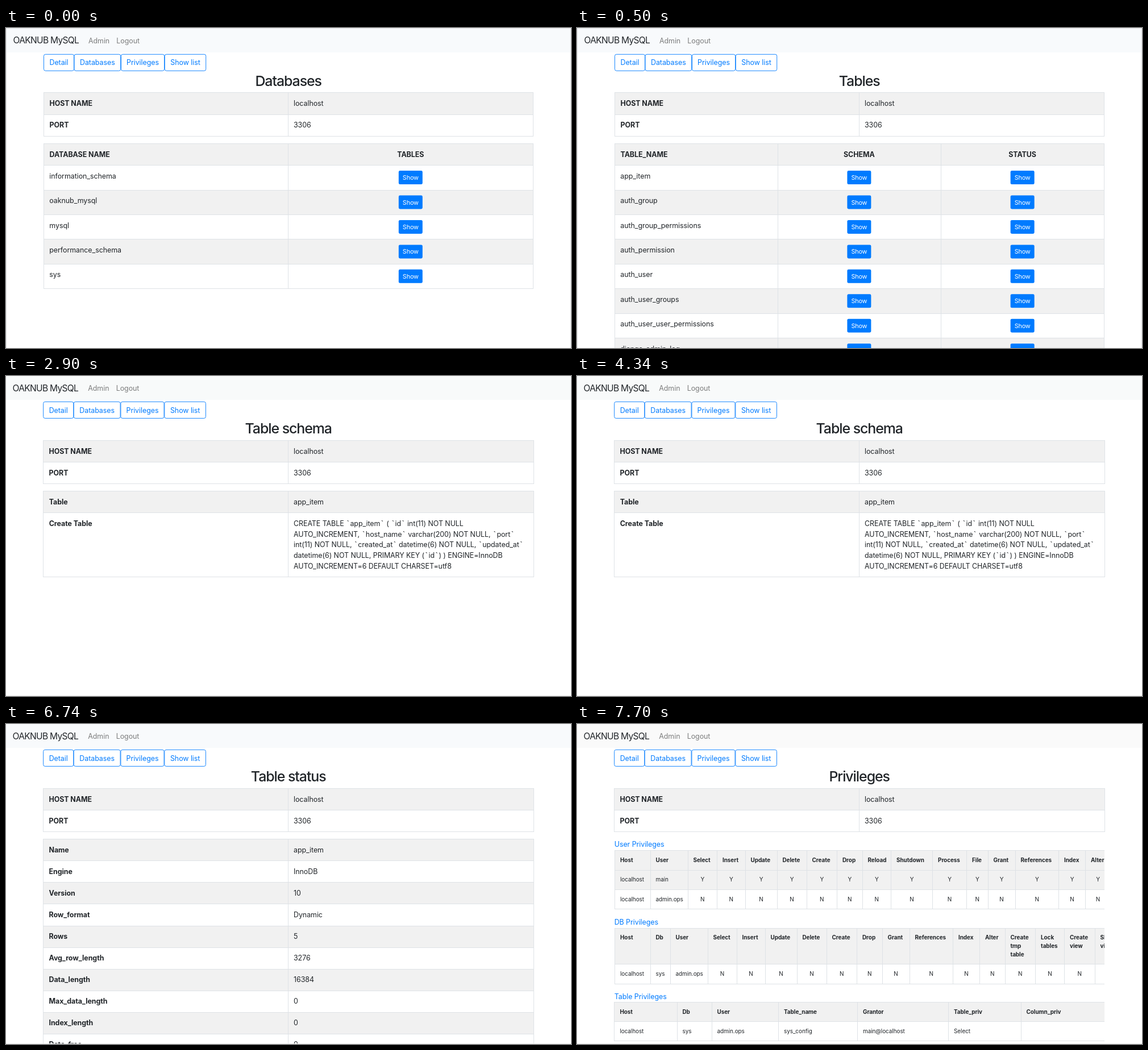
An HTML page for the animation above (8 s loop, 994 by 563 pixels).

```html
<!DOCTYPE html>
<html lang="en">
<head>
<meta charset="utf-8">
<title>Database admin</title>
<style>
  html, body { margin: 0; width: 100%; height: 100%; overflow: hidden; background: #fff; }
  svg { display: block; }
  text {
    font: 400 12.44px Inter, "Open Sans", sans-serif;
    font-optical-sizing: none;
    letter-spacing: -.06px;
    fill: #212529;
    white-space: pre;
  }
  .bold { font-weight: 700; }
  .small { font-size: 9.95px; }
  .brand { font-size: 15.55px; letter-spacing: -.7px; }
  .title { font-size: 24.9px; font-weight: 500; letter-spacing: -1.05px; }
  .mid { text-anchor: middle; }
  .muted { fill: #7c7d7d; }
  .link { fill: #007bff; }
  .show { font-size: 10.9px; letter-spacing: -.2px; fill: #fff; }
  .tick { font-family: "Noto Sans Mono", "DejaVu Sans Mono", monospace; }
  .stripe { fill: #f1f1f1; }
  .grid { fill: none; stroke: #dee2e6; }
  .stripe, .grid { shape-rendering: crispEdges; }
  .outline { fill: #fff; stroke: #007bff; stroke-width: .9; }
  .solid { fill: #007bff; }
</style>
</head>
<body>
<svg id="stage" width="994" height="563" viewBox="0 0 994 563">
  <clipPath id="scroller"><rect x="65" width="863" height="563"/></clipPath>
</svg>
<script>
const ROW = 38.06, TALL_ROW = 43.45, BASE = 23.6;
const stage = document.getElementById('stage');

const text = (x, y, s, cls = '') => `<text x="${x}" y="${y}" class="${cls}">${s}</text>`;
const rect = (x, y, w, h, attrs) => `<rect x="${x}" y="${y}" width="${w}" height="${h}" ${attrs}/>`;
const steps = (start, size, count) => Array.from({ length: count + 1 }, (_, i) => start + size * i);
const showButton = (x, top) =>
  rect(x - 21, top + 10, 42, 24, 'rx="2.4" class="solid"') + text(x, top + 26, 'Show', 'show mid');

// Column edges and row edges give the stripes and the lines.
function grid(cols, rows, striped = i => i % 2 === 0) {
  const xs = cols.map(Math.round), ys = rows.map(Math.round);
  const left = xs[0], right = xs.at(-1), top = ys[0], bottom = ys.at(-1);
  const stripes = ys.slice(0, -1).map((y, i) =>
    striped(i) ? rect(left, y, right - left, ys[i + 1] - y, 'class="stripe"') : '').join('');
  const lines = ys.map(y => `M${left} ${y + .5}H${right + 1}`).join('') +
    xs.map(x => `M${x + .5} ${top}V${bottom}`).join('');
  return stripes + `<path class="grid" d="${lines}"/>`;
}

function pairs(left, right, top, entries) {
  return grid([left, 496, right], steps(top, ROW, entries.length)) +
    entries.map(([key, value], i) => {
      const y = top + ROW * i + BASE;
      return text(left + 10.5, y, key, 'bold') + text(506, y, value);
    }).join('');
}

// Header row followed by taller rows with a button in each further column.
function listing(cols, heads, names) {
  const top = 203, first = top + ROW;
  const centers = cols.slice(1, -1).map((x, i) => (x + cols[i + 2]) / 2 + .3);
  return grid(cols, [top, ...steps(first, TALL_ROW, names.length)]) +
    heads.map((h, i) => i ? text(centers[i - 1], top + BASE, h, 'bold mid')
                          : text(76.5, top + BASE, h, 'bold')).join('') +
    names.map((name, i) => {
      const y = first + TALL_ROW * i;
      return text(76.3, y + BASE, name) + centers.map(x => showButton(x, y)).join('');
    }).join('');
}

// Without the one-pixel window frame the page fills the stage, so it is a little larger.
function page(title, body, navColor, framed) {
  const fit = v => framed ? v : (v - 1) * 994 / 992;
  const left = framed ? 66 : 65, right = framed ? 927 : 928;
  const tabs = [['Detail', 66.5, 119.5], ['Databases', 120, 201.7],
                ['Privileges', 202.5, 278.5], ['Show list', 279.3, 351.7]];
  return rect(0, 0, 994, framed ? 43 : 42, `fill="${navColor}"`) +
    text(fit(12.6), fit(27.49), 'OAKNUB MySQL', 'brand') +
    text(fit(145), fit(26.7), 'Admin', 'muted') + text(fit(194.3), fit(26.7), 'Logout', 'muted') +
    tabs.map(([label, a, b]) =>
      rect(fit(a), fit(46.3), fit(b) - fit(a), 29, 'rx="3" class="outline"') +
      text(fit((a + b) / 2), fit(65.45), label, 'link mid')).join('') +
    text(496.7, fit(102), title, 'title mid') +
    pairs(left, right, framed ? 113.45 : 113, [['HOST NAME', 'localhost'], ['PORT', '3306']]) +
    body +
    (framed ? '<path d="M.5 563V.5H993.5V563" fill="none" stroke="#e4e6e8"/>'
            : rect(0, 562, 994, 1, 'fill="#f0f0f0"'));
}

function schema() {
  const sql = [
    'CREATE TABLE `app_item` ( `id` int(11) NOT NULL',
    'AUTO_INCREMENT, `host_name` varchar(200) NOT NULL, `port`',
    'int(11) NOT NULL, `created_at` datetime(6) NOT NULL, `updated_at`',
    'datetime(6) NOT NULL, PRIMARY KEY (`id`) ) ENGINE=InnoDB',
    'AUTO_INCREMENT=6 DEFAULT CHARSET=utf8'];
  const ticked = line => line.replace(/`/g, '<tspan class="tick">`</tspan>');
  return grid([65, 496, 928], [202.3, 240.4, 353]) +
    text(75.7, 226, 'Table', 'bold') + text(506, 226, 'app_item') +
    text(75.7, 264, 'Create Table', 'bold') +
    sql.map((line, i) => text(506, 264 + 18.65 * i, ticked(line))).join('');
}

// Small table; a "|" in a heading breaks the line.
function rights(label, top, cols, rows, heads, records, striped) {
  const center = i => (cols[i] + cols[i + 1]) / 2 + .5;
  return text(65.7, top - 5.7, label, 'link') +
    `<g clip-path="url(#scroller)">` + grid(cols, rows, striped) +
    heads.map((h, i) => h.split('|').map((line, n) =>
      text(cols[i] + 10, top + 20.8 + 14.7 * n, line, 'small bold')).join('')).join('') +
    records.map((cells, r) => cells.map((cell, i) => cell.length === 1
      ? text(center(i), rows[r + 1] + 20.8, cell, 'small mid')
      : text(cols[i] + 10, rows[r + 1] + 20.8, cell, 'small')).join('')).join('') + '</g>';
}

function privileges() {
  const flags = (flag, n) => Array(n).fill(flag);
  const user = 'admin.ops';
  return rights('User Privileges', 221.7,
      [66, 128.5, 194.5, 246, 295.5, 351.5, 403.5, 457, 501.5, 552, 625, 685, 722.5, 770.5, 847, 894, 938],
      [221.7, 256.5, 291, 325.3],
      'Host User Select Insert Update Delete Create Drop Reload Shutdown Process File Grant References Index Alter'.split(' '),
      [['localhost', 'main', ...flags('Y', 14)], ['localhost', user, ...flags('N', 14)]], i => i < 2) +
    rights('DB Privileges', 358.6,
      [66, 128.5, 163.5, 229.5, 280.5, 330.5, 386.5, 438.5, 492, 536.5, 584.5, 661, 708, 752.5, 806, 857, 910.5, 960],
      [358.6, 422, 457],
      [...'Host Db User Select Insert Update Delete Create Drop Grant References Index Alter'.split(' '),
        'Create|tmp|table', 'Lock|tables', 'Create|view', 'Show|view'],
      [['localhost', 'sys', user, ...flags('N', 14)]]) +
    rights('Table Privileges', 489.2,
      [65.4, 175.5, 236.5, 354, 493, 653, 780.5, 928],
      [489.2, 523.3, 557.4],
      ['Host', 'Db', 'User', 'Table_name', 'Grantor', 'Table_priv', 'Column_priv'],
      [['localhost', 'sys', user, 'sys_config', 'main@localhost', 'Select', '']]);
}

const status = [['Name', 'app_item'], ['Engine', 'InnoDB'], ['Version', '10'], ['Row_format', 'Dynamic'],
  ['Rows', '5'], ['Avg_row_length', '3276'], ['Data_length', '16384'], ['Max_data_length', '0'],
  ['Index_length', '0'], ['Data_free', '0']];

const pages = [
  page('Databases', listing([66, 496, 927], ['DATABASE NAME', 'TABLES'],
    ['information_schema', 'oaknub_mysql', 'mysql', 'performance_schema', 'sys']), '#f8fafc', true),
  page('Tables', listing([66, 352.5, 639.7, 927], ['TABLE_NAME', 'SCHEMA', 'STATUS'],
    ['app_item', 'auth_group', 'auth_group_permissions', 'auth_permission', 'auth_user',
      'auth_user_groups', 'auth_user_user_permissions', 'django_admin_log']), '#f8fafc', true),
  page('Table schema', schema(), '#f8fafa'),
  page('Table status', pairs(65, 928, 202.3, status), '#f8fafc'),
  page('Privileges', privileges(), '#fafafa')
];
stage.innerHTML += pages.map(p => `<g class="page" display="none">${p}</g>`).join('');

const groups = stage.querySelectorAll('.page');
const ends = [500, 2900, 5300, 7700, 8000];
function draw() {
  const t = performance.now() % 8000;
  const current = ends.findIndex(end => t < end);
  groups.forEach((g, i) => g.setAttribute('display', i === current ? 'inline' : 'none'));
  requestAnimationFrame(draw);
}
draw();
</script>
</body>
</html>
```
